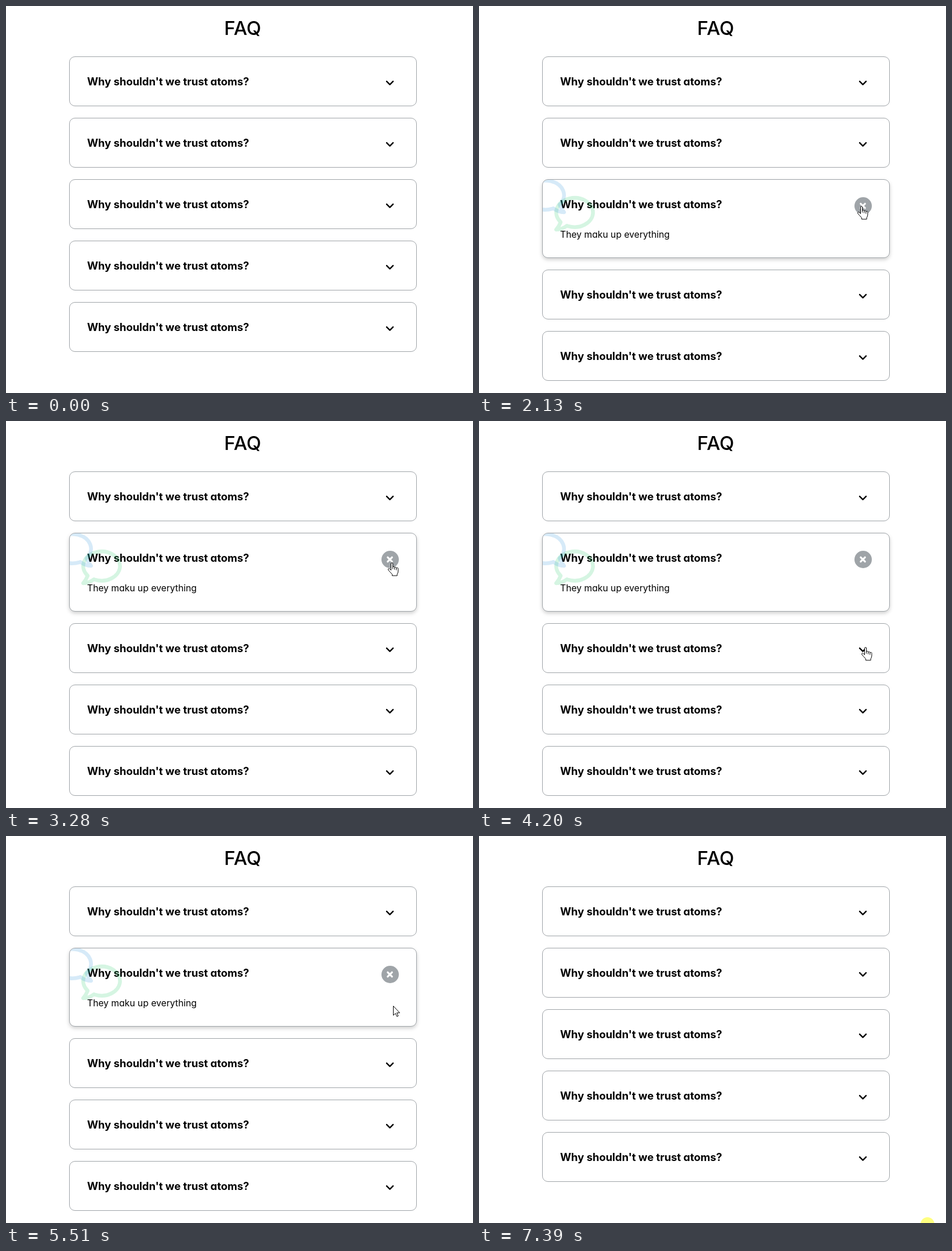
Write an HTML page that moves like this. It is 806 by 668 pixels and loops after 7450 ms.

```html
<!DOCTYPE html>
<html lang="en">
<head>
<meta charset="utf-8">
<title>FAQ</title>
<style>
  html, body { margin: 0; width: 100%; height: 100%; overflow: hidden; background: #fff; }
  svg { display: block; }
  text { font-family: Inter, "Open Sans", sans-serif; font-feature-settings: "cv11"; fill: #000; }
  .heading { font-size: 33px; font-weight: 500; }
  .question { font-size: 18.4px; font-weight: 700; }
  .answer { font-size: 15.7px; }
  .frame { fill: #fff; stroke: #9fa4a8; }
  .open .frame { filter: drop-shadow(0 3px 3px rgba(0, 0, 0, .19)); }
  .open .chevron, g:not(.open) > .details { display: none; }
  .bubble { fill: none; stroke-width: 48; stroke-linejoin: round; opacity: .2; }
  .chevron { fill: none; stroke: #000; stroke-width: 2.4; stroke-linecap: round; stroke-linejoin: round; }
  .cross { stroke: #fff; stroke-width: 3.2; stroke-linecap: round; }
  .cursor { fill: #fff; stroke: #000; stroke-linejoin: round; }
</style>
</head>
<body>
<svg width="806" height="668" viewBox="0 0 806 668">
  <defs>
    <clipPath id="inside"><rect x="1" y="1" width="598" height="134" rx="9"/></clipPath>
    <path id="bubble" d="M170 411A232 184 0 1 0 70 350L80 362Q60 415 24 456Q95 456 159 407Z"/>
  </defs>
  <text class="heading" x="408.5" y="49.5" text-anchor="middle">FAQ</text>
  <g id="cards"></g>
  <circle id="spot" cx="774" cy="670" r="12" fill="#ffff80"/>
  <g id="pointer" class="cursor">
    <path id="arrow" d="M.5 .5V16.5L4.2 13.2 6.7 18.6 9 17.6 6.5 12.2H11.5Z"/>
    <path id="hand" transform="translate(-7 0)"/>
  </g>
</svg>
<script>
const LOOP = 7450;
const CARD_X = 109, FIRST_Y = 87, GAP = 20, CLOSED = 86, OPEN = 136;
const TOGGLE = { x: 554, y: 46, r: 15 };
const POINTER_IN = 190, POINTER_OUT = 7390, MOVE_TIME = 700;

const visits = [
  { card: 2, opens: 960, closes: 2280 },
  { card: 1, opens: 3280, closes: 6300 },
  { card: 2, opens: 4360, closes: 5200 }
];

// Each move eases to its goal, bowing sideways by bend
const entry = { x: 738, y: 642 };
const moves = [
  { at: 190, x: 660, y: 345, bend: -58 },
  { at: 2360, x: 666, y: 244, bend: 5 },
  { at: 3590, x: 666, y: 392, bend: 18 },
  { at: 5210, x: 669, y: 246, bend: 0 },
  { at: 6310, x: 744, y: 639, bend: 0 },
  { at: 7020, x: 786, y: 668, bend: 0 }
];

const $ = id => document.getElementById(id);
const show = (element, on) => { element.style.display = on ? '' : 'none'; };

function handOutline() {
  const width = 3.1, knuckle = i => 8.5 + i;
  let outline = 'M5.5 13.5V2', creases = '';
  for (let i = 0; i < 4; i++) {
    outline += `a1.6 1.6 0 0 1 ${width} 0V${knuckle(i)}`;
    if (i < 3) creases += `M${5.5 + width * (i + 1)} ${knuckle(i)}v3`;
  }
  return outline + 'V15q0 3-1.8 5.5V23H7.5V20.5Q3.5 16.5 .8 13q-.8-1.8 .8-2.3 1.8-.4 3.9 2.8Z' + creases;
}
$('hand').setAttribute('d', handOutline());

const cards = Array.from({ length: 5 }, () => {
  const g = document.createElementNS('http://www.w3.org/2000/svg', 'g');
  g.innerHTML = `
    <rect class="frame" x=".5" y=".5" width="599" rx="9.5"/>
    <text class="question" x="31" y="50">Why shouldn't we trust atoms?</text>
    <path class="chevron" d="M548 43.1l5.5 5.5 5.5-5.5"/>
    <g class="details">
      <text class="answer" x="31" y="101">They maku up everything</text>
      <g clip-path="url(#inside)">
        <use href="#bubble" class="bubble" stroke="#2ecc71" transform="translate(21 24.6) scale(.1367)"/>
        <use href="#bubble" class="bubble" stroke="#3498db" transform="translate(41 -5.4) scale(-.1367 .1367)"/>
      </g>
      <circle cx="${TOGGLE.x}" cy="${TOGGLE.y}" r="${TOGGLE.r}" fill="#9fa4a8"/>
      <path class="cross" d="M549.8 42.3l7.4 7.4m0-7.4l-7.4 7.4"/>
    </g>`;
  $('cards').append(g);
  return g;
});

function pointerAt(time) {
  let { x, y } = entry;
  for (const move of moves) {
    const u = Math.min(1, Math.max(0, (time - move.at) / MOVE_TIME));
    const eased = u * (2 - u);
    x += (move.x - x) * eased + move.bend * Math.sin(Math.PI * eased);
    y += (move.y - y) * eased;
  }
  return { x: Math.round(x), y: Math.round(y) };
}

function draw(time) {
  const pointer = pointerAt(time);
  let y = FIRST_Y, overToggle = false;

  cards.forEach((card, index) => {
    const open = visits.some(v => v.card === index && time >= v.opens && time < v.closes);
    const height = open ? OPEN : CLOSED;
    card.setAttribute('transform', `translate(${CARD_X} ${y})`);
    card.setAttribute('class', open ? 'open' : '');
    card.firstElementChild.setAttribute('height', height - 1);

    const distance = Math.hypot(pointer.x - CARD_X - TOGGLE.x, pointer.y - y - TOGGLE.y);
    overToggle ||= distance < TOGGLE.r;
    y += height + GAP;
  });

  $('pointer').setAttribute('transform', `translate(${pointer.x} ${pointer.y})`);
  show($('pointer'), time >= POINTER_IN && time < POINTER_OUT);
  show($('arrow'), !overToggle);
  show($('hand'), overToggle);
  show($('spot'), time >= POINTER_OUT);
}

const start = performance.now();
function tick() {
  draw((performance.now() - start) % LOOP);
  requestAnimationFrame(tick);
}
tick();
</script>
</body>
</html>
```
